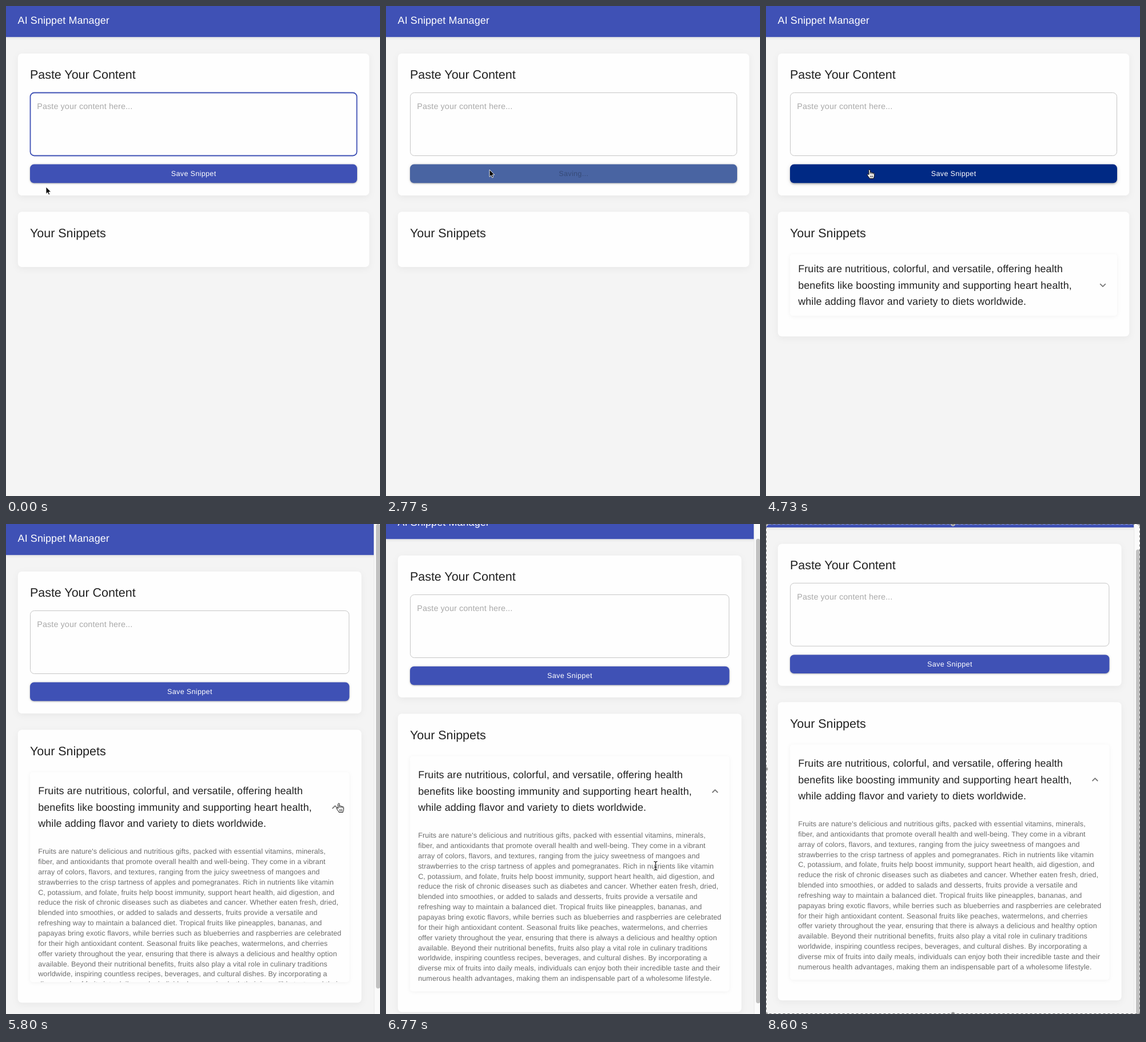
Recreate the animation shown at these times as an HTML page. Size 654 px wide and 856 px high, loop 8710 ms.

```html
<!DOCTYPE html>
<html lang="en">
<head>
<meta charset="utf-8">
<title>AI Snippet Manager</title>
<style>
  html, body { margin: 0; width: 100%; height: 100%; overflow: hidden; background: #f4f4f4; }
  svg { display: block; width: 654px; height: 856px; font-family: "Liberation Sans", Arial, sans-serif; cursor: default; }
  text { fill: #212121; white-space: pre; text-rendering: geometricPrecision; }
  .h5 { font-size: 21.43px; }
  .h6 { font-size: 17.86px; letter-spacing: .0075em; }
  .body1 { font-size: 14.29px; letter-spacing: .00938em; }
  .body2 { font-size: 12.5px; letter-spacing: .01071em; fill: #6c6c6c; }
  .label { font-size: 12.5px; letter-spacing: .02857em; text-anchor: middle; }
  .card { fill: #fefefe; filter: drop-shadow(0 3px 6px rgba(0,0,0,.05)); }
  .item { fill: #fefefe; filter: drop-shadow(0 1px 3px rgba(0,0,0,.05)); }
</style>
</head>
<body>
<svg viewBox="0 0 654 856">
  <defs>
    <clipPath id="fold"><rect id="foldBox" x="42" width="580"/></clipPath>
    <clipPath id="view"><rect x="44" y="165" width="568" height="84"/></clipPath>
  </defs>
  <rect width="654" height="856" fill="#f4f4f4"/>
  <g id="page">
    <rect width="654" height="54.2" fill="#3f51b5" style="filter:drop-shadow(0 2px 2px rgba(0,0,0,.08))"/>
    <text class="h6" x="20.6" y="31.2" style="fill:#fff">AI Snippet Manager</text>

    <rect id="card1" class="card" x="20.8" y="83" height="248" rx="7"/>
    <text class="h5" x="42" y="127.2">Paste Your Content</text>
    <rect id="field" x="42.5" y="151.5" height="110" rx="7" fill="#fefefe"/>
    <text id="hint" class="body1" x="54.3" y="180" style="fill:#a9a9a9">Paste your content here...</text>
    <g id="pasted">
      <g id="pastedText" clip-path="url(#view)"></g>
      <rect x="588" y="166" width="13.5" height="82" fill="#fafafa"/>
      <path d="M588.5 166V248M601.5 166V248" stroke="#ebebeb"/>
      <rect x="591.3" y="230" width="7.4" height="16" rx="3.7" fill="#c1c1c1"/>
    </g>
    <rect id="caret" width="1" height="16" fill="#212121"/>
    <rect id="button" x="42" y="276.6" height="32.6" rx="7"/>
    <text id="buttonText" class="label" y="297.3"></text>

    <rect id="card2" class="card" x="20.8" y="359.5" rx="7"/>
    <text class="h5" x="42" y="404.1">Your Snippets</text>
    <g id="snippet">
      <rect id="item" class="item" x="42" y="433.5" rx="5"/>
      <g id="summary"></g>
      <path id="chevron" d="M-4.8 -2.4L0 2.4L4.8 -2.4" fill="none" stroke="#757575" stroke-width="1.8"/>
      <g id="details" clip-path="url(#fold)"></g>
    </g>
  </g>
  <g id="scrollbar">
    <rect x="643.3" width="11" height="856" fill="#fafafa"/>
    <path d="M643.8 0V856" stroke="#e6e6e6"/>
    <rect id="thumb" x="647" width="7.4" height="811.5" rx="3.7" fill="#c1c1c1"/>
  </g>
  <g id="marquee">
    <rect x=".5" y=".5" width="653" height="855" fill="none" stroke="#fff" stroke-opacity=".4"/>
    <rect x=".5" y=".5" width="653" height="855" fill="none" stroke="#777" stroke-dasharray="4 4"/>
  </g>
  <g id="cursor">
    <path id="arrow" d="M0 0V12.4L2.8 9.7L4.7 14L6.7 13.1L4.9 8.9H8.7Z" fill="#000" stroke="#fff" stroke-width=".9"/>
    <g id="hand" stroke="#000" stroke-linejoin="round" stroke-linecap="round">
      <path d="M-1.4 1.2C-1.4 -.4 1.2 -.4 1.2 1.2V5.2C1.6 4.2 3.6 4.2 3.8 5.6C4.4 4.8 6 5 6.2 6.2C7 5.6 8.4 6 8.4 7.4V10.5C8.4 13 7.2 13.6 7.2 15.5H0C0 14 -2.8 11.5 -3.8 9.2C-4.4 7.8 -2.8 7 -1.4 8.6Z" fill="#fff"/>
      <path d="M1.2 5.2V7.6M3.8 5.6V7.8M6.2 6.2V8M1.4 10.6V13.2M3.5 10.6V13.2M5.5 10.6V13.2" fill="none" stroke-width=".8"/>
    </g>
    <g id="beam" fill="none" stroke-linecap="round">
      <path d="M-2.6 -7.4Q0 -7.4 0 -5.4Q0 -7.4 2.6 -7.4M0 -5.4V5.4M-2.6 7.4Q0 7.4 0 5.4Q0 7.4 2.6 7.4M-1.6 2.4H1.6" stroke="#fff" stroke-width="2.4"/>
      <path d="M-2.6 -7.4Q0 -7.4 0 -5.4Q0 -7.4 2.6 -7.4M0 -5.4V5.4M-2.6 7.4Q0 7.4 0 5.4Q0 7.4 2.6 7.4M-1.6 2.4H1.6" stroke="#111" stroke-width="1.1"/>
    </g>
  </g>
</svg>
<script>
const LOOP = 8710;
const PASTE = 1100, PRESS = 2600, SEND = 2700, SAVED = 4330, OPEN = 5620;
const NS = 'http://www.w3.org/2000/svg';
const el = {};
document.querySelectorAll('[id]').forEach(n => el[n.id] = n);

const set = (node, attrs) => { for (const k in attrs) node.setAttribute(k, attrs[k]); };
const show = (node, on) => { node.style.display = on ? '' : 'none'; };
const clamp = v => Math.min(1, Math.max(0, v));
const mix = (a, b, p) => a + (b - a) * p;
const smooth = v => { v = clamp(v); return v * v * (3 - 2 * v); };

// cubic-bezier(.4, 0, .2, 1)
function ease(x) {
  x = clamp(x);
  let lo = 0, hi = 1;
  for (let i = 0; i < 18; i++) {
    const s = (lo + hi) / 2, r = 1 - s;
    if (1.2 * s * r * r + .6 * s * s * r + s * s * s < x) lo = s; else hi = s;
  }
  return smooth(lo);
}

function addLines(parent, cls, x, y, step, lines) {
  lines.forEach((line, i) => {
    const t = document.createElementNS(NS, 'text');
    set(t, { class: cls, x, y: y + i * step });
    t.textContent = line;
    parent.append(t);
  });
}

addLines(el.pastedText, 'body1', 54.3, 182.4, 20.54, [
  'inspiring countless recipes, beverages, and cultural dishes. By incorporating a',
  'diverse mix of fruits into daily meals, individuals can enjoy both their incredible',
  'taste and their numerous health advantages, making them an indispensable part',
  'of a wholesome lifestyle.'
]);
addLines(el.summary, 'h6', 56.2, 465.2, 28.57, [
  'Fruits are nutritious, colorful, and versatile, offering health',
  'benefits like boosting immunity and supporting heart health,',
  'while adding flavor and variety to diets worldwide.'
]);
addLines(el.details, 'body2', 56.2, 576.2, 17.85, [
  "Fruits are nature's delicious and nutritious gifts, packed with essential vitamins, minerals,",
  'fiber, and antioxidants that promote overall health and well-being. They come in a vibrant',
  'array of colors, flavors, and textures, ranging from the juicy sweetness of mangoes and',
  'strawberries to the crisp tartness of apples and pomegranates. Rich in nutrients like vitamin',
  'C, potassium, and folate, fruits help boost immunity, support heart health, aid digestion, and',
  'reduce the risk of chronic diseases such as diabetes and cancer. Whether eaten fresh, dried,',
  'blended into smoothies, or added to salads and desserts, fruits provide a versatile and',
  'refreshing way to maintain a balanced diet. Tropical fruits like pineapples, bananas, and',
  'papayas bring exotic flavors, while berries such as blueberries and raspberries are celebrated',
  'for their high antioxidant content. Seasonal fruits like peaches, watermelons, and cherries',
  'offer variety throughout the year, ensuring that there is always a delicious and healthy option',
  'available. Beyond their nutritional benefits, fruits also play a vital role in culinary traditions',
  'worldwide, inspiring countless recipes, beverages, and cultural dishes. By incorporating a',
  'diverse mix of fruits into daily meals, individuals can enjoy both their incredible taste and their',
  'numerous health advantages, making them an indispensable part of a wholesome lifestyle.'
]);

for (const x of [0, 327, 654]) for (const y of [0, 428, 856]) {
  if (x === 327 && y === 428) continue;
  const dot = document.createElementNS(NS, 'circle');
  set(dot, { cx: x, cy: y, r: 3.4, fill: '#8c8c8c', stroke: '#ddd' });
  el.marquee.append(dot);
}

// Button looks: red, green, blue, elevation
const IDLE = [63, 81, 181, 1], HOVER = [0, 41, 132, 1.8], DISABLED = [224, 224, 224, 0];
const looks = [[-999, IDLE], [115, HOVER], [260, IDLE], [1590, HOVER], [SEND, DISABLED], [SAVED, HOVER], [4850, IDLE]];

function lookAt(t, i = looks.length - 1) {
  while (i > 0 && looks[i][0] > t) i--;
  const [start, to] = looks[i];
  if (!i) return to;
  const from = lookAt(start, i - 1), p = ease((t - start) / 250);
  return to.map((v, k) => mix(from[k], v, p));
}

function buttonShadow(lift) {
  const fade = Math.min(1, lift);
  return `drop-shadow(0 ${1.3 * lift}px ${.8 * lift}px rgba(0,0,0,${.24 * fade})) ` +
    `drop-shadow(0 ${.8 * lift}px ${2 * lift}px rgba(0,0,0,${.12 * fade}))`;
}

// Pointer moves: start, end, x, y
const moves = [[30, 620, 135.5, 199], [1280, 1680, 181, 286], [4750, 5270, 582, 488], [6000, 6430, 471.5, 597], [8390, 8620, 22, 686]];

function pointer(t) {
  let x = 70, y = 316;
  for (const [a, b, tx, ty] of moves) {
    const p = smooth((t - a) / (b - a));
    x = mix(x, tx, p);
    y = mix(y, ty, p);
  }
  return [x, y];
}

function pointerKind(t, y) {
  if (t >= 8130) return 'arrow';
  if (y > 152 && y < 262) return 'beam';
  if (y > 276.5 && y < 309.5) return t >= SEND && t < SAVED ? 'arrow' : 'hand';
  if (t >= SAVED && y > 433 && y < 555) return 'hand';
  return t >= OPEN && y > 562 ? 'beam' : 'arrow';
}

function drawForm(t, cut) {
  const filled = t >= PASTE && t < SEND, focused = t < PRESS, saving = t >= SEND && t < SAVED;
  set(el.card1, { width: 614.4 - cut });
  set(el.field, { width: 571 - cut, stroke: focused ? '#3f51b5' : '#c6c6c6', 'stroke-width': focused ? 1.8 : 1 });
  show(el.hint, !filled);
  show(el.pasted, filled);

  const blink = filled ? (t - PASTE) % 1030 < 515 : t >= 300 && t < 800;
  show(el.caret, focused && blink);
  set(el.caret, filled ? { x: 213, y: 231 } : { x: 54, y: 167 });

  const [r, g, b, lift] = lookAt(t);
  set(el.button, { width: 572 - cut, fill: `rgb(${r},${g},${b})` });
  el.button.style.filter = buttonShadow(lift);
  el.buttonText.textContent = saving ? 'Saving...' : 'Save Snippet';
  el.buttonText.style.fill = saving ? 'rgba(0,0,0,.26)' : '#fff';
  set(el.buttonText, { x: 328.2 - cut / 2 });
}

function drawSnippet(t, cut, turn, bottom) {
  const saved = t >= SAVED, shift = 7.1 * turn;
  show(el.snippet, saved);
  set(el.card2, { width: 614.4 - cut, height: saved ? bottom + 36 - 359.5 : 96.5 });
  set(el.item, { width: 572 - cut, height: bottom - 433.5 });
  set(el.summary, { transform: `translate(0 ${shift})` });
  set(el.chevron, { transform: `translate(${589 - cut} ${487.7 + shift}) rotate(${180 * turn})` });
  const top = 541.3 + 2 * shift;
  set(el.foldBox, { y: top, height: Math.max(0, bottom - top) });
}

function draw(t) {
  const turn = ease((t - OPEN) / 150);
  const bottom = 541.3 + 14.2 * turn + 289 * ease((t - OPEN) / 320);
  const overflow = bottom > 796;
  const cut = overflow ? 13.6 : 0;
  drawForm(t, cut);
  drawSnippet(t, cut, turn, bottom);

  const scrolled = smooth(clamp((t - 6570) / 400) ** .86);
  set(el.page, { transform: `translate(0 ${-48.2 * scrolled})` });
  show(el.scrollbar, overflow);
  set(el.thumb, { y: 44.5 * scrolled });
  el.marquee.style.opacity = clamp((t - 8100) / 130);

  const [x, y] = pointer(t), kind = pointerKind(t, y);
  show(el.cursor, t < 8600);
  set(el.cursor, { transform: `translate(${x} ${y})` });
  for (const k of ['arrow', 'hand', 'beam']) show(el[k], k === kind);
}

const began = performance.now();
function tick() {
  draw((performance.now() - began) % LOOP);
  requestAnimationFrame(tick);
}
tick();
</script>
</body>
</html>
```
